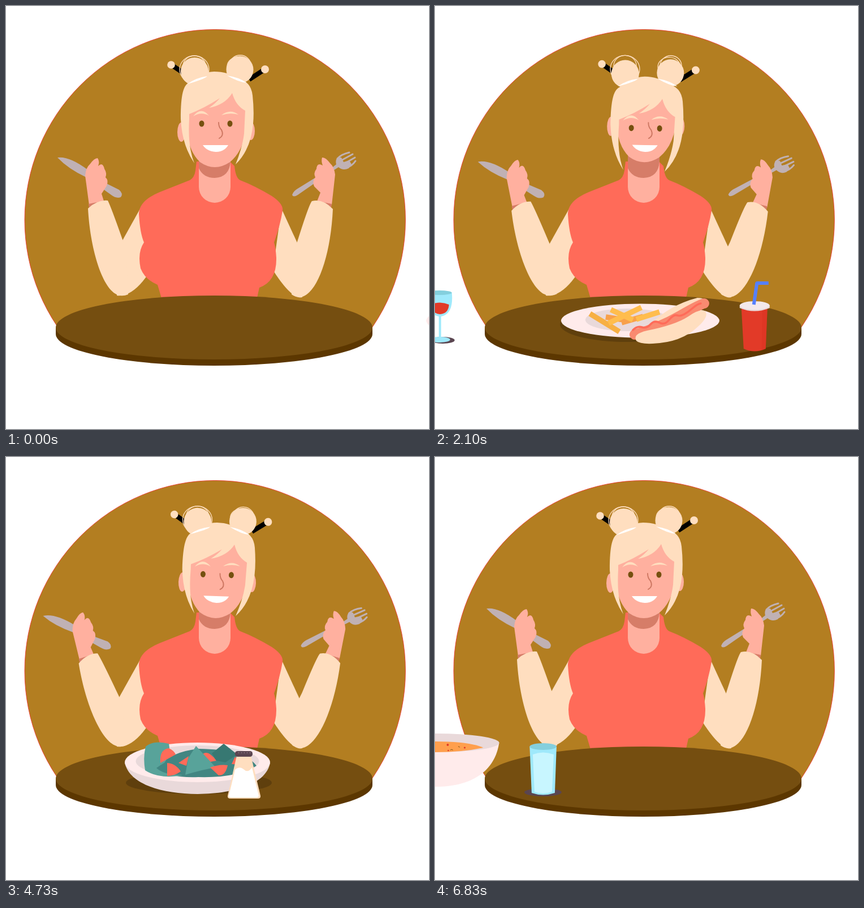
Write an HTML page that moves like this. It is 748 px wide and 748 px high and loops after 6.86 s.

```html
<!DOCTYPE html>
<html lang="en">
<head>
<meta charset="utf-8">
<title>Dinner time</title>
<style>
html,body{margin:0;width:100%;height:100%;overflow:hidden;background:#fff}
svg{display:block;width:100vw;height:100vh}
.skin{fill:#ffb09f}.shade{fill:#d67d68}.cream{fill:#ffdebf}.steel{fill:#c0b1b4}
.plate{fill:#ffebeb}.dish{fill:#e9d9da}.cast{fill:#5f3f0d}.plum{fill:#5a4550}
.red{fill:#e23a28}.coral{fill:#ff6b59}.glass{fill:#9fe9fb}.rim{fill:#84cfdd}
.leaf{fill:#58a39a}.dark{fill:#428682}
.line{fill:none;stroke-linecap:round;stroke-linejoin:round}
.flat{stroke-linecap:butt}
</style>
</head>
<body>
<svg viewBox="0 0 748 748">
<defs>
  <clipPath id="above"><path d="M0 0H748V572H0Z"/></clipPath>
  <clipPath id="tabletop"><ellipse cx="368" cy="568.5" rx="280" ry="56.5"/></clipPath>
</defs>
<circle cx="369.7" cy="378.2" r="336.7" fill="#b37e21" stroke="#f02a2a" stroke-width=".8" clip-path="url(#above)"/>

<!-- arms -->
<path class="cream" d="M238 357L199 427L196 512Q224 515 252 473Z"/>
<path class="cream" d="M487 358L522 434L524 515Q506 520 472 467Z"/>
<g id="armL">
  <path class="steel" d="M91 268Q112 265 145 290L142 303Q110 288 91 268ZM176 313L200 325Q208 332 203 338Q195 341 186 334L172 324Z"/>
  <path class="skin" d="M147 352L140 300Q141 286 149 279Q156 269 162 269Q166 275 163 283Q171 275 174 288Q179 296 176 303Q182 308 178 318L169 332L174 348Z"/>
  <path class="shade" d="M146 350L166 346L147 359Z"/>
  <path class="cream" d="M145 358Q162 342 180 344Q186 356 206 413L212 430L216 510Q209 513 202 512C172 508 149 432 145 358Z"/>
</g>
<g id="armR">
  <path class="steel" d="M506 334Q508 328 514 324L548 303L552 309L516 334Q508 339 506 334ZM574 288L584 280Q582 273 586 268L593 268L597 276L607 273L611 280L606 287Q596 292 588 285L577 292Z"/>
  <path class="line" stroke="#c0b1b4" stroke-width="3" d="M586 270Q593 262 607 259M591 274L613 262M596 280L617 268M602 286Q612 283 618 274"/>
  <path class="skin" d="M576 352L582 298Q580 284 573 278Q565 267 559 268Q557 274 560 282Q550 276 549 288Q543 296 547 303Q541 310 545 319L556 330L549 348Z"/>
  <path class="shade" d="M556 346L576 350L575 358Z"/>
  <path class="cream" d="M541 345Q560 340 578 359C574 446 548 515 518 515Q510 514 505 510L509 432L515 417Q536 350 541 345Z"/>
</g>

<!-- body -->
<path class="coral" d="M337 275L335 291Q333 304 325 308L272 329Q235 344 235 368Q237 402 244 418Q232 436 238 464Q246 484 268 493L276 520H443L448 498Q479 487 478 445Q477 428 474 418Q485 388 489 362Q491 350 470 336Q440 318 414 308Q406 304 404 283L397 276Z"/>
<path class="skin" d="M341 262V320A28 28 0 0 0 397 320V262Z"/>
<path class="shade" d="M341 262V287Q349 304 369 304Q395 303 397 275V262Z"/>

<!-- head -->
<g id="head">
  <g id="ears" class="skin"><ellipse cx="310" cy="223" rx="7" ry="17"/><ellipse cx="433" cy="221" rx="7" ry="16"/></g>
  <path id="face" class="skin" d="M321 175L350 150H410L424 175V222Q418 258 396 276Q369 294 343 276Q326 260 321 230Z"/>
  <g id="eyes">
    <g fill="#75500f"><ellipse cx="346" cy="208" rx="4.5" ry="5.5"/><ellipse cx="396" cy="208" rx="4.5" ry="5.5"/></g>
    <path class="cream" d="M331 195Q345 177 359 194Q345 186 331 195ZM381 193Q396 181 411 192Q396 188 381 193Z"/>
  </g>
  <path class="line" stroke="#cd7762" stroke-width="1.9" d="M376 206Q376 214 381 219Q386 229 377 234"/>
  <path fill="#fff" d="M348 246Q370 246 393 246Q386 258 371 258Q355 257 348 246Z"/>
  <path class="line flat" stroke="#000" stroke-width="8.5" d="M294 105L316 120M456 113L430 130"/>
  <g class="cream"><circle cx="292" cy="104" r="6.8"/><circle cx="458" cy="112" r="7"/></g>
  <g class="line" stroke="#ffdebf" stroke-width="1.3"><ellipse cx="333" cy="112" rx="26" ry="24"/><ellipse cx="333" cy="106" rx="20" ry="18"/><ellipse cx="414" cy="105" rx="19" ry="18"/><ellipse cx="411" cy="107" rx="20" ry="17"/></g>
  <path id="hair" class="cream" d="M309 200C309 155 314 140 324 135Q344 117 368 116Q393 116 408 128Q433 132 436 158Q439 186 437 208Q433 254 406 280Q418 250 421 226L423 185Q406 176 400 154Q387 175 359 180Q371 172 378 163Q350 181 324 191V200Q321 248 333 278Q314 250 310 212Z"/>
  <g id="buns">
    <g class="cream"><circle cx="333.5" cy="115.5" r="24.5"/><circle cx="413.5" cy="112.5" r="24"/></g>
    <path fill="#fff" d="M321 138Q335 127 356 124Q352 129 321 138ZM391 123Q412 126 426 136Q412 135 391 123Z"/>
  </g>
</g>

<!-- table and the shadows on it -->
<path fill="#5c3700" d="M88 568.5V580A280 56 0 0 0 648 580V568.5Z"/>
<ellipse cx="368" cy="568.5" rx="280" ry="56.5" fill="#754e10"/>
<g clip-path="url(#tabletop)">
  <ellipse class="cast pasta" cx="330" cy="563" rx="125" ry="31"/>
  <ellipse class="cast hotdog" cx="300" cy="563" rx="119" ry="31"/>
  <ellipse class="cast salad" cx="341" cy="576" rx="129" ry="20"/>
  <ellipse class="cast soup" cx="348" cy="575" rx="86" ry="20"/>
</g>

<!-- pasta and wine -->
<g class="pasta">
  <ellipse class="plate" cx="347" cy="557" rx="130.5" ry="28.5"/>
  <ellipse class="dish" cx="347" cy="560" rx="63" ry="18"/>
  <path id="strands" class="line" stroke="#f4b443" stroke-width="1.7"/>
  <path fill="#eb921f" d="M277 543Q290 536 303 526Q322 513 345 516Q365 514 382 526Q399 536 407 546Q400 555 386 551Q372 561 354 556Q334 561 321 551Q298 547 277 543Z"/>
  <path class="line" stroke="#f4b443" stroke-width="1.7" d="M284 542Q330 505 362 519T404 544M305 547Q340 520 391 551M312 531Q340 558 381 527M330 517Q350 536 399 537"/>
  <g fill="#f0a13a" stroke="#5c4049" stroke-width="3.4"><ellipse cx="327" cy="523" rx="6" ry="4"/><ellipse cx="368" cy="521" rx="5.5" ry="3"/><ellipse cx="349" cy="528" rx="5.5" ry="3.3"/><ellipse cx="322" cy="543" rx="5" ry="3.5"/><ellipse cx="352" cy="540" rx="5" ry="2.5"/><ellipse cx="375" cy="534" rx="5" ry="4"/></g>
  <path class="coral" d="M291 553Q297 541 309 546Q308 558 299 558ZM392 550Q402 542 417 553Q407 562 397 556ZM352 551Q373 554 377 571Q362 577 355 568Z"/>
</g>
<g class="wine">
  <ellipse class="plum" cx="436" cy="591" rx="21" ry="6"/>
  <ellipse class="glass" cx="431" cy="590" rx="18" ry="5"/>
  <path class="line" stroke="#9fe9fb" stroke-width="4" d="M431 546V588"/>
  <path class="glass" d="M410 507Q407 539 423 547Q431 551 439 547Q455 539 452 507Z"/>
  <ellipse class="rim" cx="431" cy="507" rx="21" ry="4"/>
  <path class="red" d="M415 528Q431 521 447 528Q446 544 431 545Q417 544 415 528Z"/>
</g>

<!-- hot dog and drink -->
<g class="hotdog">
  <ellipse class="plate" cx="323" cy="556.5" rx="140" ry="30"/>
  <ellipse class="dish" cx="300" cy="555" rx="74" ry="20"/>
  <g class="line flat" stroke-width="9.5">
    <path class="flat" stroke="#f8a04a" d="M262 550L300 556M290 560L328 549"/>
    <path class="flat" stroke="#ffbd4d" d="M271 537L310 555M316 554L357 541"/>
    <path class="flat" stroke="#f7b044" d="M234 544L286 576"/>
    <path class="flat" stroke="#ffbd4d" d="M267 561L325 533"/>
  </g>
  <path class="cream" d="M342 562Q375 529 424 516Q442 516 436 527L380 555Z"/>
  <path class="line" stroke="#f98a70" stroke-width="18" d="M313 581Q355 570 393 548T436 526"/>
  <path class="cream" d="M316 592Q309 580 335 574Q385 564 408 549Q429 534 438 540Q445 549 425 567Q396 595 345 597Q322 598 316 592Z"/>
  <path class="line" stroke="#ff6b59" stroke-width="3.5" d="M310 573Q318 565 326 568T341 563T357 560T374 555T388 547T401 545T416 534T430 526"/>
</g>
<g class="drink">
  <path class="red" d="M404 534L408 606Q427 615 447 606L450 534Z"/>
  <path fill="#d93420" d="M441 538H450L447 606L440 609Z" opacity=".45"/>
  <path class="dish" d="M401 530V534Q427 545 454 534V530Z"/>
  <ellipse cx="427.5" cy="529.5" rx="26.5" ry="7.5" fill="#f3e9eb"/>
  <path class="line flat" stroke="#5580ff" stroke-width="6" d="M426 528L431.500 490H452"/>
</g>

<!-- salad and salt -->
<g class="salad">
  <path class="dish" d="M210 540C217 578 275 596 339 596C408 595 460 577 467 541Z"/>
  <ellipse class="plate" cx="338.5" cy="540" rx="128.5" ry="35"/>
  <ellipse class="dish" cx="338.5" cy="538" rx="109" ry="28"/>
  <path class="dark" d="M264 550Q292 521 340 516Q422 517 443 546Q408 568 340 566Q289 568 264 550Z"/>
  <path class="leaf" d="M247 512Q262 500 288 507Q293 530 272 550L312 563Q270 570 246 554Q242 530 247 512Z"/>
  <path class="dark" d="M266 550Q290 532 320 527L332 560Q285 567 266 550Z"/>
  <path class="coral" d="M273 541Q271 517 288 515Q297 519 300 526ZM285 541Q300 542 309 556Q298 564 285 564ZM305 541L323 529L319 546ZM348 525Q358 518 372 537L356 540ZM399 543L405 530L418 544Z"/>
  <path fill="#377872" d="M364 524L385 507L409 526L388 540L372 537Z"/>
  <path class="leaf" d="M317 562L322 533L336 511L371 549Q346 553 317 562Z"/>
  <path class="coral" d="M361 549Q377 543 392 545Q388 564 376 563Z"/>
</g>
<g class="salt">
  <path class="cream" d="M408 528L392 599Q391 604 397 604H445Q451 604 450 599L433 528Z"/>
  <path fill="#fff" d="M405 553Q413 546 420 552Q428 560 435 549L447 599Q447 602 443 602H398Q394 602 394 599Z"/>
  <rect class="plum" x="405" y="520" width="31" height="10" rx="4.5"/>
  <path class="line" stroke="#8a7680" stroke-width="1.5" stroke-dasharray="1 4" d="M411 523H432"/>
</g>

<!-- soup and water -->
<g class="soup">
  <path class="plate" d="M245 505C252 560 300 583 356 583C412 583 459 560 467 505Z"/>
  <ellipse class="dish" cx="356" cy="505.5" rx="111" ry="16.5"/>
  <path fill="#ff9f4d" d="M264 515Q292 503 351 503Q415 503 439 514Q402 522 354 522Q304 522 264 515Z"/>
  <g class="red"><circle cx="325" cy="513" r="1.7"/><circle cx="376" cy="509" r="2"/><circle cx="406" cy="514" r="1.6"/><circle cx="308" cy="518" r="1.3"/><circle cx="345" cy="506" r="1"/><circle cx="377" cy="519" r="1.3"/><circle cx="333" cy="518" r="1.2"/></g>
  <path class="line" stroke="#754e10" d="M321 509l3 1M381 518q2-2 4 0M395 512l2 1"/>
  <path class="cream" d="M231 562L311 571L291 617L257 591L243 575Z"/>
  <path class="steel" d="M227 577Q231 571 262 577L305 583Q316 577 331 580Q343 586 343 594Q339 602 323 602Q309 599 303 589L262 587Q230 585 227 577Z"/>
</g>
<g class="water">
  <ellipse class="plum" cx="477" cy="593" rx="33" ry="7"/>
  <path class="glass" d="M453.500 512L457 594Q477 601 498 594L501 512Z"/>
  <path fill="#c8f6ff" d="M459 526Q477 519 496 526L493 592Q477 598 462 592Z"/>
  <ellipse class="rim" cx="477.3" cy="512" rx="23.8" ry="6"/>
</g>
</svg>
<script>
const LOOP = 6860, TRAVEL = 560, SLIDE = 600;
const el = id => document.getElementById(id);
const place = (node, transform) => node.setAttribute('transform', transform);
const shift = (node, x, y) => place(node, `translate(${x} ${y})`);
const smooth = u => { u = Math.min(1, Math.max(0, u)); return u * u * (3 - 2 * u); };

// Eased value along [time, value] keys.
function track(keys, t) {
  let value = keys[0][1];
  for (let i = 1; i < keys.length; i++) {
    const [t0, v0] = keys[i - 1], [t1, v1] = keys[i];
    if (t >= t0) value = v0 + (v1 - v0) * smooth((t - t0) / (t1 - t0));
  }
  return value;
}

const armLeft = [[0, 0], [970, -6], [1640, -6], [2690, 0], [3500, 0], [4500, -6], [5270, -6], [6320, 0]];
const armRight = [[60, 0], [1030, 4.8], [1870, 4.8], [2720, 0], [3560, 0], [4560, 4.8], [5460, 4.8], [6310, 0]];
const tilt = [[0, 0], [650, 1], [1550, -5], [2150, 1.1], [2830, 0], [3530, 0], [4500, 1.8], [4760, 1.8], [5150, -5], [6050, 1.2], [6750, 0]];
const nod = [[700, 0], [1400, 1], [1950, 1], [2830, 0]];

// class, slide-in start, slide-out start, resting shift
const dishes = [
  ['pasta', 0, 1599, 0], ['wine', 100, 1695, 0],
  ['hotdog', 1599, 3260, 0], ['drink', 1695, 3360, 0],
  ['salad', 3260, 4930, 0], ['salt', 3360, 5073, 0],
  ['soup', 4920, 6486, -11], ['water', 4970, 6556, -41]
].map(([name, enter, leave, rest]) => ({
  nodes: document.querySelectorAll('.' + name), enter, leave, rest
}));

// Loose noodles: overlapping flat loops around the plate.
let noodles = '';
for (let i = 0; i < 9; i++) {
  const x = 312 + i * 9.5, y = 557 + 7 * Math.sin(i * 2.3), rx = 26 + 14 * Math.abs(Math.sin(i * 1.7));
  noodles += `M${x - rx} ${y}a${rx} ${9 + i % 3 * 2} 0 1 0 ${2 * rx} 0q-${rx} -14 -${1.6 * rx} -3`;
}
el('strands').setAttribute('d', noodles + 'M256 547Q290 560 330 551T442 549M264 554Q300 538 330 564T437 556M270 541Q300 552 322 560');

function draw(t) {
  place(el('armL'), `rotate(${track(armLeft, t)} 203 518)`);
  place(el('armR'), `rotate(${track(armRight, t)} 518 518)`);
  place(el('head'), `rotate(${track(tilt, t)} 372 285)`);
  const n = track(nod, t);
  shift(el('ears'), 0, -10 * n);
  shift(el('face'), 0, -9.5 * n);
  shift(el('eyes'), 0, 8.8 * n);
  shift(el('buns'), 0, 5.5 * n);
  place(el('hair'), `translate(0 ${9.5 * n + 116}) scale(1 ${1 + .025 * n}) translate(0 -116)`);
  for (const { nodes, enter, leave, rest } of dishes) {
    const x = TRAVEL * (1 - smooth((t - enter) / SLIDE) - smooth((t - leave) / SLIDE));
    nodes.forEach(node => shift(node, x + rest, 0));
  }
}

const start = performance.now();
function frame(now) {
  draw(Math.max(0, now - start) % LOOP);
  requestAnimationFrame(frame);
}
draw(0);
requestAnimationFrame(frame);
</script>
</body>
</html>
```
